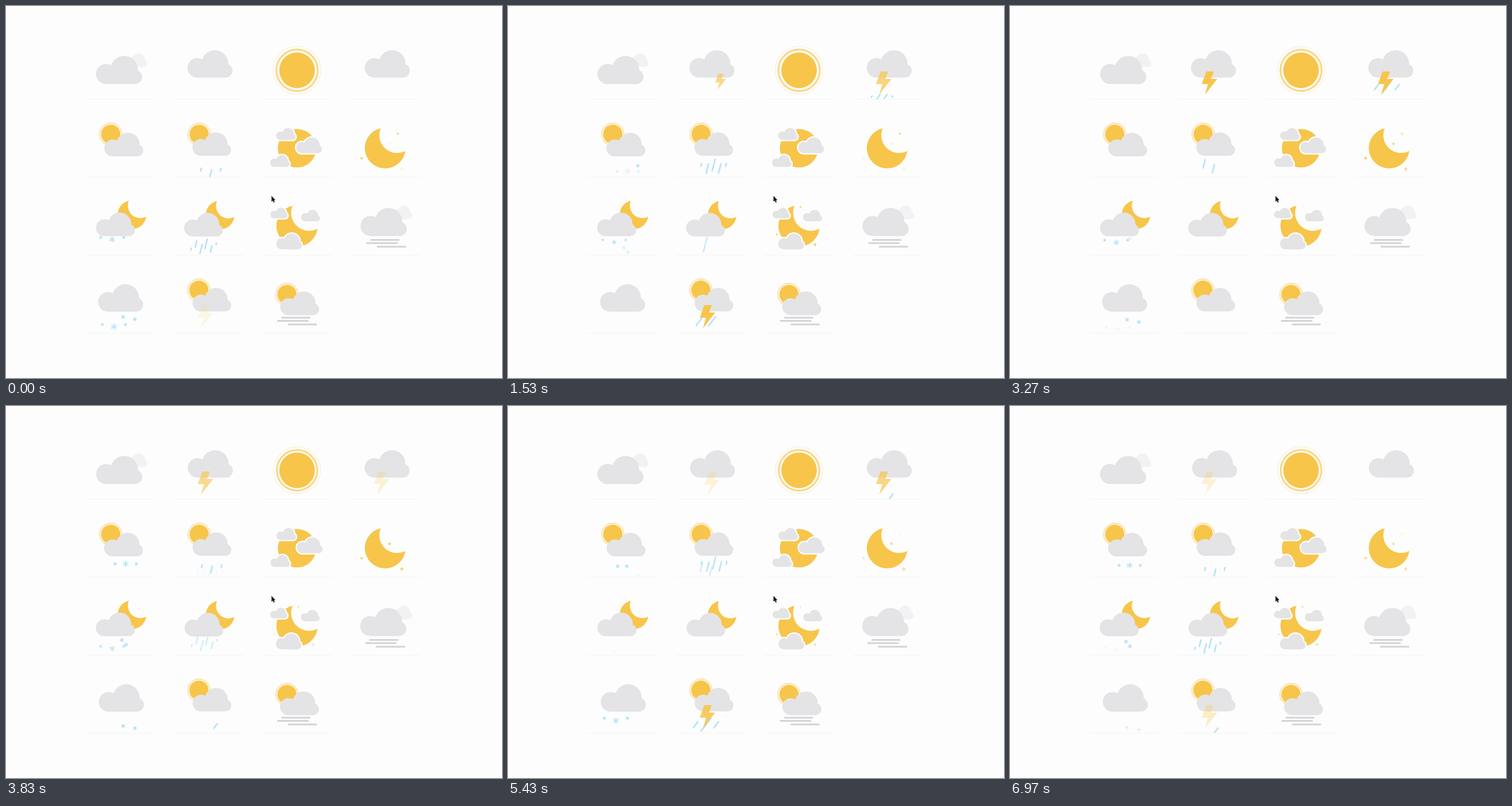
These frames come from a looping animation (864x648 px, 7.01 s). An HTML page with a canvas:

```html
<!DOCTYPE html>
<html lang="en">
<head>
<meta charset="utf-8">
<title>Weather icons</title>
<style>
html, body { margin: 0; width: 100%; height: 100%; overflow: hidden; background: #fdfdfd; }
canvas { display: block; }
</style>
</head>
<body>
<canvas id="stage" width="864" height="648"></canvas>
<script>
const ctx = document.getElementById('stage').getContext('2d');
const LOOP = 7010, CYCLE = 3, TAU = Math.PI * 2;
const PAPER = '#fdfdfd', GREY = '#e4e4e6', PALE = '#f2f2f4', SUN = '#f7c54a', BLUE = '#b4e2f9', FOG = '#d3d3d5';
let now = 0;

const clamp = v => Math.max(0, Math.min(1, v));
const mod = (v, n) => (v % n + n) % n;

// Slow oscillation around zero, highest at the peak time.
const sway = (amp, peak, period = CYCLE) => amp * Math.cos(TAU * (now - peak) / period);
const twinkle = (peak, period = CYCLE) => 0.52 + sway(0.46, peak, period);

// Quick rise, hold, then a slower decay over the last third.
function flash(start, end) {
  const age = mod(now - start, CYCLE), life = end - start;
  return Math.min(clamp(age / 0.17), clamp((life - age) / (life * 0.35)));
}

function disc(x, y, r, color) {
  ctx.fillStyle = color;
  ctx.beginPath();
  ctx.arc(x, y, r, 0, TAU);
  ctx.fill();
}

function ring(x, y, r, width, color) {
  ctx.strokeStyle = color;
  ctx.lineWidth = width;
  ctx.beginPath();
  ctx.arc(x, y, r, 0, TAU);
  ctx.stroke();
}

function line(x1, y1, x2, y2, width, color) {
  ctx.strokeStyle = color;
  ctx.lineWidth = width;
  ctx.beginPath();
  ctx.moveTo(x1, y1);
  ctx.lineTo(x2, y2);
  ctx.stroke();
}

function polygon(points, color) {
  ctx.fillStyle = color;
  ctx.beginPath();
  points.forEach(p => ctx.lineTo(p[0], p[1]));
  ctx.closePath();
  ctx.fill();
}

// x, y is the top left corner, w the full width.
function cloud(x, y, w, color = GREY, rim = 0) {
  const s = w / 80.5;
  ctx.save();
  ctx.translate(x, y);
  ctx.scale(s, s);
  const path = new Path2D();
  for (const [cx, cy, r] of [[17.5, 31.5, 17.5], [49, 24, 24], [68, 36.5, 12.5]]) {
    path.moveTo(cx + r, cy);
    path.arc(cx, cy, r, 0, TAU);
  }
  path.rect(17.5, 30, 50.5, 19);
  if (rim) {
    ctx.lineJoin = 'round';
    ctx.lineWidth = rim * 2 / s;
    ctx.strokeStyle = PAPER;
    ctx.stroke(path);
  }
  ctx.fillStyle = color;
  ctx.fill(path);
  ctx.restore();
}

const rimmedCloud = (x, y, w) => cloud(x, y, w, GREY, 2.3);

function smallSun(x, y) {
  disc(x, y, 16.8, SUN);
  ring(x, y, 18.9, 1.1, '#f9d687');
  ring(x, y, 20.5 + sway(0.2, 0, 1.5), 1, '#fceecb');
}

function bigSun(x, y) {
  const pulse = sway(0.4, 0, 1.5);
  disc(x, y, 31, SUN);
  ring(x, y, 35.7 + pulse, 3.2, '#f9d887');
  ring(x, y, 41.2 + pulse, 1.4, '#fcf1da');
}

function moon(x, y, r) {
  ctx.save();
  ctx.beginPath();
  ctx.rect(0, 0, 864, 648);
  ctx.arc(x + 0.58 * r, y - 0.63 * r, 0.87 * r, 0, TAU);
  ctx.clip('evenodd');
  disc(x, y, r, SUN);
  ctx.restore();
}

function star(x, y, r, alpha) {
  ctx.globalAlpha = alpha;
  polygon(Array.from({ length: 8 }, (_, i) => {
    const a = i * TAU / 8, d = i % 2 ? r * 0.45 : r;
    return [x + d * Math.cos(a), y + d * Math.sin(a)];
  }), SUN);
  ctx.globalAlpha = 1;
}

const BOLT = [[8, 0], [21, 0], [16, 13], [27, 13], [5.5, 40.5], [11, 22], [0, 22]];
function bolt(x, y, alpha, s = 1) {
  ctx.globalAlpha = alpha;
  polygon(BOLT.map(p => [x + p[0] * s, y + p[1] * s]), SUN);
  ctx.globalAlpha = 1;
}

function flake(x, y, r) {
  for (let i = 0; i < 3; i++) {
    const a = (i + 0.5) * TAU / 6;
    const dx = Math.cos(a) * r, dy = Math.sin(a) * r;
    line(x - dx, y - dy, x + dx, y + dy, 1.6, BLUE);
  }
}

function drop(slope) {
  return (x, y, len) => {
    const dy = Math.max(1, len - 2) / Math.hypot(slope, 1) / 2;
    line(x - dy * slope, y - dy, x + dy * slope, y + dy, 2.6, BLUE);
  };
}

// A row of n particles born together, largest in the middle; y is reached at half life.
function burst(kind, { n = 1, x, gap = 0, y, zig = 0, size, birth, life }) {
  const age = mod(now - birth, kind.period);
  if (age >= life) return;
  const fall = kind.speed * (age - life / 2);
  ctx.globalAlpha = clamp(Math.min(age, life - age) / kind.fade);
  for (let i = 0; i < n; i++)
    kind.draw(x + gap * i + kind.slope * fall, y + (i % 2 ? -zig : zig) + fall,
      size * Math.sin(Math.PI * (i + 0.5) / n));
  ctx.globalAlpha = 1;
}

const RAIN = { period: 1, speed: 36, slope: -0.25, fade: 0.12, draw: drop(-0.25) };
const STORM = { period: CYCLE, speed: 55, slope: -0.75, fade: 0.12, draw: drop(-0.75) };
const SNOW = { period: CYCLE, speed: 19, slope: 0, fade: 0.22, draw: flake };

// Bursts cut off at the ground line.
function shower(kind, ground, ...bursts) {
  ctx.save();
  ctx.beginPath();
  ctx.rect(0, 0, 864, ground);
  ctx.clip();
  ctx.lineCap = kind === SNOW ? 'butt' : 'round';
  bursts.forEach(b => burst(kind, b));
  ctx.restore();
}

function fog(x, y, shift) {
  ctx.lineCap = 'round';
  for (const [dx, dy, w] of [[8.5, 0, 48], [1.5, 5.6, 52], [20, 11.8, 48]])
    line(x + dx + shift, y + dy, x + dx + w + shift, y + dy, 3, FOG);
  ctx.lineCap = 'butt';
}

const ground = row => 162 + row * 135.8;

function rules() {
  ctx.fillStyle = '#f4f4f2';
  for (let i = 0; i < 15; i++)
    ctx.fillRect(138 + i % 4 * 154, ground(Math.floor(i / 4)), 122, 1);
}

function rowOne() {
  const drift = sway(1, 0.5);
  cloud(207 + drift / 2, 82.5, 38.5, PALE);
  cloud(156.2 + drift, 87, 80.5);

  cloud(316.2 + sway(1, 1.1, 1.5), 77, 78.5);
  bolt(334, 114, flash(0.02, 1.05));
  bolt(361, 118, flash(1.42, 2.35), 0.69);
  bolt(342, 115, flash(2.4, 2.98));

  bigSun(507, 112);

  shower(STORM, ground(0),
    { n: 3, x: 631, gap: 18, y: 151, size: 27, birth: 0.12, life: 0.65 },
    { n: 4, x: 638, gap: 12, y: 152, size: 12, birth: 1.1, life: 0.65 },
    { x: 668, y: 157, size: 12, birth: 2.1, life: 0.65 });
  cloud(624.6 + sway(0.8, 1.2, 1.5), 77, 78.5);
  bolt(641, 114, flash(0.03, 0.9));
  bolt(641, 114, flash(1.41, 2.75));
}

function rowTwo() {
  smallSun(182.5, 223.5);
  shower(SNOW, ground(1),
    { n: 3, x: 190, gap: 18.5, y: 279, size: 5.5, birth: 0.5, life: 1.1 },
    { x: 226, y: 283, size: 3, birth: 1.1, life: 1.36 },
    { n: 2, x: 191, gap: 16, y: 280, size: 5, birth: 2, life: 0.95 });
  cloud(171.3 + sway(0.5, 2.2), 220.7, 68);

  smallSun(336.5, 223.5);
  shower(RAIN, ground(1),
    { n: 5, x: 336, gap: 10.8, y: 282, zig: -3, size: 23, birth: 0.32, life: 0.53 },
    { n: 2, x: 338, gap: 16, y: 280, zig: -4, size: 24, birth: 0.1, life: 0.4 },
    { n: 3, x: 340, gap: 17, y: 287, zig: -3, size: 14, birth: 0.72, life: 0.5 });
  cloud(324.8 + sway(0.3, 1, 1.5), 220, 67.5);

  const drift = 0.6 + sway(0.6, 0.8, 1.5);
  disc(507, 247.8, 33.5, SUN);
  rimmedCloud(470.5 + drift / 2, 212.5, 34);
  rimmedCloud(505.5 + drift, 229, 45);
  rimmedCloud(460 + drift / 2, 259.5, 34);

  moon(660.5, 247.5, 35.5);
  star(682.5, 222.5, 2.6, twinkle(0, 1.5));
  star(668, 240, 3.6, twinkle(0.6, 1.5));
  star(619.5, 265, 3.4, twinkle(0.4));
  star(689.5, 284, 4, twinkle(0.6, 1.5));
}

function rowThree() {
  moon(219.5, 363.5, 25);
  shower(SNOW, ground(2),
    { n: 3, x: 165, gap: 20, y: 412, zig: -2, size: 5.2, birth: -0.25, life: 1.25 },
    { n: 2, x: 202, gap: 7, y: 413, zig: -4, size: 5, birth: 0.2, life: 1.4 },
    { n: 3, x: 165, gap: 20, y: 415, zig: -2, size: 4, birth: 1.2, life: 1.25 });
  cloud(156 + sway(0.8, 0.3), 359.7, 68);

  moon(373, 364, 25);
  shower(RAIN, ground(2),
    { n: 6, x: 322, gap: 8.8, y: 419.5, zig: 4.5, size: 19, birth: 0.76, life: 0.52 },
    { x: 343, y: 418, size: 28, birth: 0.45, life: 0.3 });
  cloud(310.7 + sway(0.4, 0.8, 1.5), 360.3, 67.5);

  const drift = sway(0.7, 2.2);
  moon(507, 383, 36);
  rimmedCloud(460.5 + drift / 2, 351.5, 30);
  rimmedCloud(514 + drift / 2, 355, 33);
  rimmedCloud(470.5 + drift, 396.5, 45);
  star(509.5, 350, 2.3, twinkle(1.5));
  star(468, 398, 2.6, twinkle(1.8));
  star(535, 415.5, 3.2, twinkle(1.7));

  cloud(669 - drift / 2, 347.7, 38.5, PALE);
  cloud(617.2 + sway(0.3, 0, 1.5), 351.7, 80.5);
  fog(626.6, 407.5, sway(0.9, 0, 1.5));
}

function rowFour() {
  shower(SNOW, ground(3),
    { n: 3, x: 168, gap: 20, y: 551, zig: -2, size: 5.6, birth: 2.1, life: 1.2 },
    { n: 2, x: 204, gap: 20.5, y: 551, zig: -2, size: 5, birth: 2.75, life: 1.3 });
  cloud(161 + sway(0.7, 0.9, 1.5), 484.6, 78.5);

  smallSun(336, 495);
  shower(STORM, ground(3),
    { n: 2, x: 329, gap: 22, y: 555, size: 30, birth: 1.37, life: 0.55 },
    { n: 3, x: 327, gap: 18, y: 555, size: 30, birth: 2.1, life: 0.65 },
    { n: 2, x: 337, gap: 37, y: 550, size: 14, birth: 2.42, life: 0.38 },
    { x: 360, y: 564, size: 12, birth: 0.7, life: 0.5 });
  cloud(325 + sway(0.4, 1.1, 1.5), 491, 67.5);
  bolt(334, 521, flash(0.92, 3.1));

  smallSun(489.5, 502.5);
  cloud(477.6 + sway(0.4, 2.2), 497.2, 68);
  fog(473, 543, sway(1, 1.9));
}

function cursor() {
  const tip = [[462.5, 330.8], [462.5, 341], [464.8, 339], [466.3, 342.6],
    [468, 341.8], [466.5, 338.4], [469.3, 338.2]];
  polygon(tip, '#111');
}

function frame() {
  now = (performance.now() % LOOP) / 1000;
  ctx.fillStyle = PAPER;
  ctx.fillRect(0, 0, 864, 648);
  rules();
  rowOne();
  rowTwo();
  rowThree();
  rowFour();
  cursor();
  requestAnimationFrame(frame);
}
frame();
</script>
</body>
</html>
```
